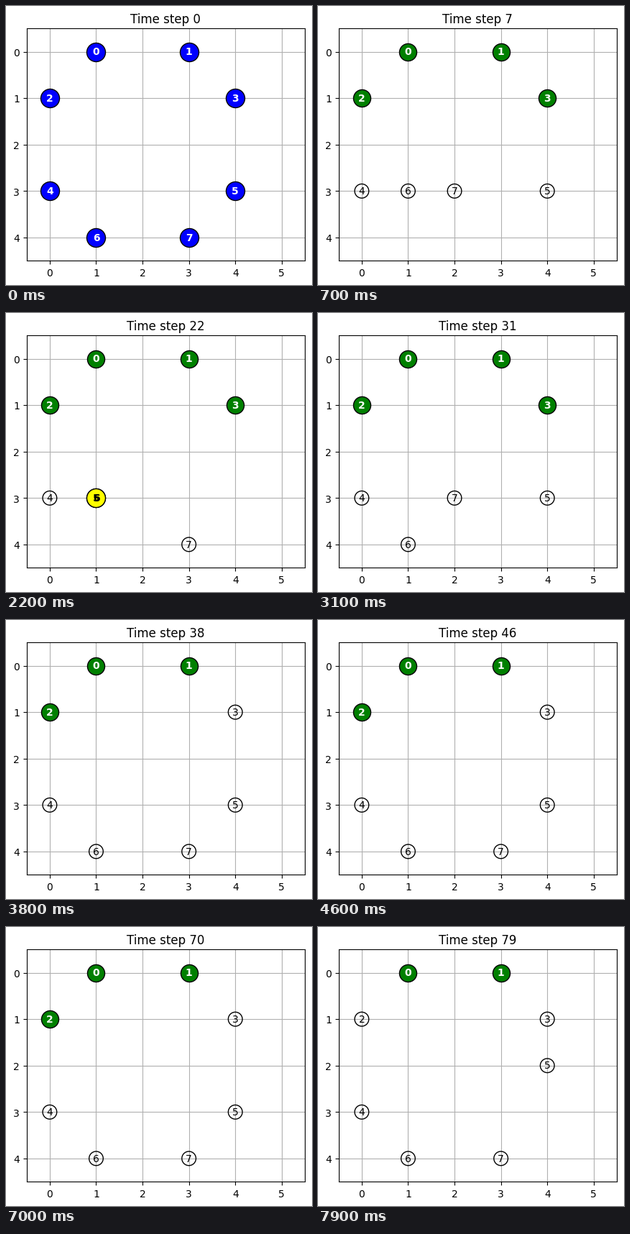
Animation of 426x388 px, one loop 8000 ms. Source, as a matplotlib script:

```python
from itertools import product

import matplotlib.pyplot as plt
from matplotlib.animation import FuncAnimation
from matplotlib.transforms import ScaledTranslation

W, H, DPI = 426, 388, 100
STEPS, STEP_MS = 80, 100
PORT = (5, 2)

# ions sit on a ring of cells around the centre (2, 2)
HOMES = [(x, y) for y, x in product(range(5), repeat=2)
         if abs(x - 2) + abs(y - 2) == 3]

# kind: fill, marker area, text colour, weight
STYLES = {
    "single": ("blue", 350, "white", "bold"),
    "pair": ("yellow", 350, "black", "bold"),
    "fresh": ("green", 300, "white", "bold"),
    "idle": ("none", 200, "black", "normal"),
}


def inner(ion):
    """Inner cell next to an ion's home."""
    return tuple(min(max(c, 1), 3) for c in HOMES[ion])


def route(ion, zone):
    """Grid cells from an ion's home to a zone, one per step."""
    pos = list(HOMES[ion])
    cells = [tuple(pos)]
    vertical_first = pos[1] in (0, 4) or zone == PORT
    for axis in (1, 0) if vertical_first else (0, 1):
        while pos[axis] != zone[axis]:
            pos[axis] += 1 if zone[axis] > pos[axis] else -1
            cells.append(tuple(pos))
    return cells


def plan():
    """Joint gates: each ion in turn, from 6 down, meets all higher ones."""
    pairs = [(low, high) for low in range(6, 2, -1)
             for high in range(7, low, -1)]
    starts = [(17 + 13 * k) // 2 for k in range(6)] + [49, 57, 75]
    meetings = []
    for pair, start in zip(pairs, starts):
        host, guest = sorted(pair, key=lambda n: inner(n)[0])
        right_side = HOMES[host][0] == HOMES[guest][0] == 4
        zone = PORT if right_side else inner(host)
        paths = {n: route(n, zone) for n in (host, guest)}
        # a long trip is used for two pulses
        end = start + (4 if len(paths[guest]) > 4 else 1)
        # the host comes a step earlier and clears the way out
        spans = {host: (start - 1, end),
                 guest: (start, end + len(paths[host]) - 1)}
        meetings.append((start, end, paths, spans))
    return meetings


MEETINGS = plan()


def state(ion, t):
    """Position and kind of an ion at step t."""
    opening = 1 + 36 * max(0, 4 - ion)
    rest = "idle" if t >= opening else "fresh"
    for start, end, paths, spans in MEETINGS:
        if ion not in paths:
            continue
        path, (arrive, leave) = paths[ion], spans[ion]
        last = len(path) - 1
        if arrive - last < t < leave + last:
            i = last - max(0, arrive - t, t - leave)
            pulse = start <= t <= end and (t - start) % 3 < 2
            return path[i], "pair" if pulse else rest
    # gates at home: the opening one, then a regular refresh for moving ions
    refresh = ion > 2 and t > opening and (t - 12 * ion - 5) % 25 == 0
    single = t in (0, opening) or refresh
    return HOMES[ion], "single" if single else rest


fig = plt.figure(figsize=(W / DPI, H / DPI), dpi=DPI)
cell = 387.5 / 6
ax = fig.add_axes([28.6 / W, 33.8 / H, 6 * cell / W, 5 * cell / H])
ax.set(xlim=(-0.5, 5.5), ylim=(4.5, -0.5), xticks=range(6), yticks=range(5))
ax.grid(True)
title = ax.set_title("Time step 0")

dots = [ax.scatter(x, y, edgecolors="black", linewidths=1, zorder=3)
        for x, y in HOMES]
tags = [ax.text(x, y, str(n), ha="center", va="center", zorder=4)
        for n, (x, y) in enumerate(HOMES)]

# all text sits a fraction of a pixel low
nudge = ScaledTranslation(0, -0.75 / DPI, fig.dpi_scale_trans)
for text in [title, *tags, *ax.get_xticklabels(), *ax.get_yticklabels()]:
    text.set_transform(text.get_transform() + nudge)


def draw(t):
    title.set_text(f"Time step {t}")
    for ion, (dot, tag) in enumerate(zip(dots, tags)):
        pos, kind = state(ion, t)
        fill, area, ink, weight = STYLES[kind]
        dot.set_offsets([pos])
        dot.set_facecolor(fill)
        dot.set_sizes([area])
        tag.set_position(pos)
        tag.set_color(ink)
        tag.set_fontweight(weight)
    return [title, *dots, *tags]


anim = FuncAnimation(fig, draw, frames=STEPS, interval=STEP_MS,
                     repeat=True, repeat_delay=0, blit=False)
plt.show()
```
